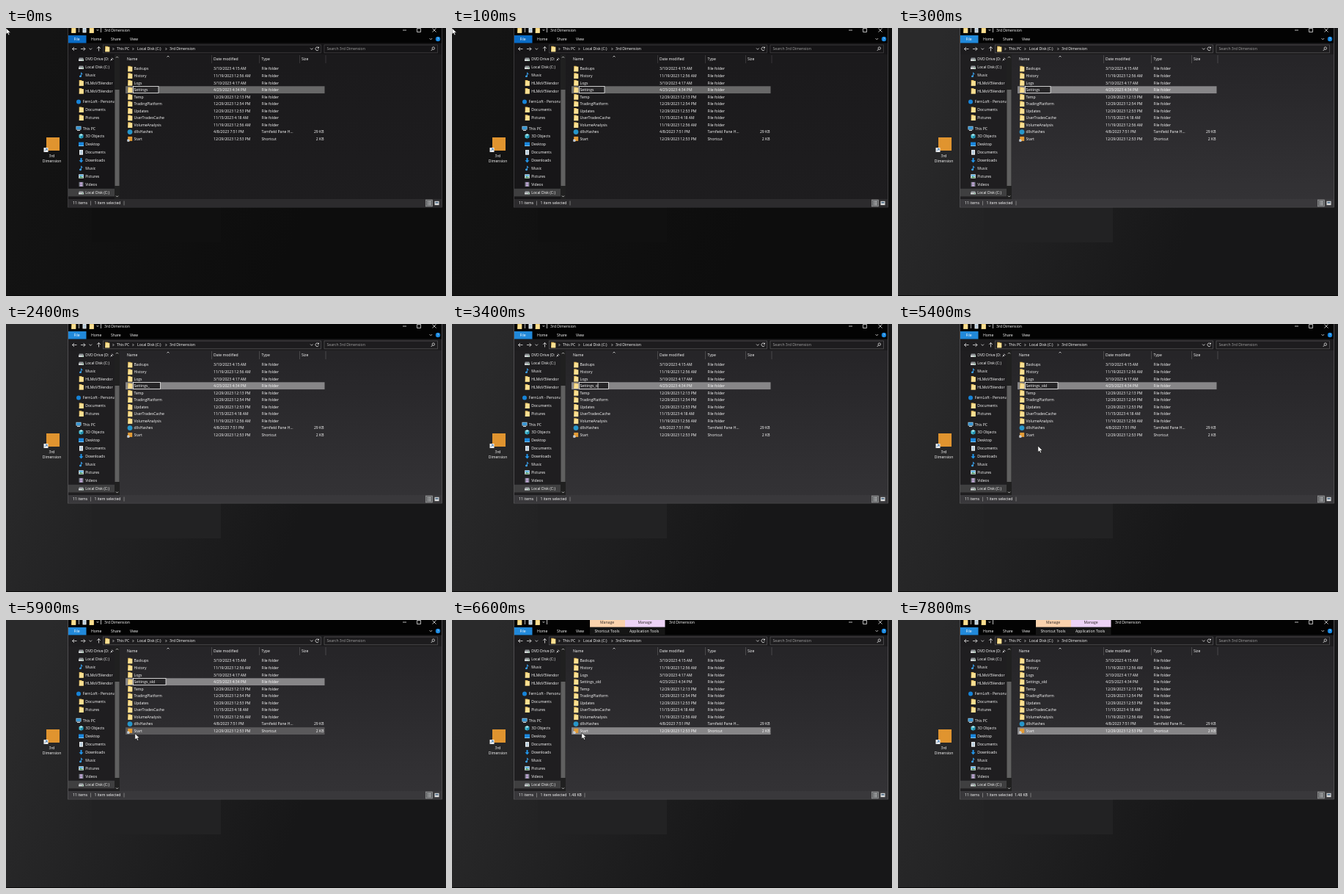
Recreate the animation shown at these times as an HTML page. Size 600 by 365 pixels, loop 8000 ms.

```html
<!DOCTYPE html>
<html lang="en">
<head>
<meta charset="utf-8">
<title>Renaming a folder</title>
<style>
  html, body { margin: 0; width: 100%; height: 100%; overflow: hidden; background: #111; }
  svg {
    display: block; width: 100vw; height: 100vh;
    --desk-left: #2a2a2b; --desk-right: #171718; --panes: #222223;
    --list-top: #262528; --list-end: #343336; --nav: #1f1e20; --bar: #1d1c1e;
    --status: #39383b; --row: #878688; --line: #59585a; --accent: #2189da;
    font: 500 5.1px "Open Sans", "Noto Sans", sans-serif;
  }
  svg.dim {
    --desk-left: #141414; --desk-right: #0d0d0d; --panes: #101010;
    --list-top: #1b1a1c; --list-end: #1e1d1f; --nav: #171618; --bar: #161517;
    --status: #2c2b2d; --row: #686868; --line: #454446; --accent: #0a6cc6;
  }
  text { fill: #fff; white-space: pre; }
  .muted { fill: #a3a3a3; }
  .dark { fill: #2b2422; }
  .stroke { fill: none; stroke: #e4e4e4; stroke-width: .8; }
  .field { fill: none; stroke: var(--line); stroke-width: .7; }
</style>
</head>
<body>
<svg id="stage" viewBox="0 0 600 365" preserveAspectRatio="none">
  <defs>
    <linearGradient id="desk" x2="1" y2=".25">
      <stop offset=".1" style="stop-color:var(--desk-left)"/>
      <stop offset=".8" style="stop-color:var(--desk-right)"/>
    </linearGradient>
    <linearGradient id="sheet" x2="0" y2="1">
      <stop offset=".2" style="stop-color:var(--list-top)"/>
      <stop offset="1" style="stop-color:var(--list-end)"/>
    </linearGradient>
    <clipPath id="navClip"><rect x="85" y="36" width="62.5" height="197"/></clipPath>
    <g id="folder">
      <path d="M-2.8-3.8h3.4l.6.9h2v6.600h-6z" fill="#e3bd5e"/>
      <path d="M-1.800-2.600h5v6.400h-6z" fill="#fbe093"/>
    </g>
    <g id="disk">
      <path d="M-2.6-1.6h5.2l.9 2h-7z" fill="#8f9498"/>
      <path d="M-3.5.4h7v2.4h-7z" fill="#d4d7d9"/>
      <path d="M1.2 1.2h1.4v.8H1.2z" fill="#37a853"/>
    </g>
    <path id="note" d="M-.4-3.4h.9c.3 1.5 2 1.5 1.7 3.4-.5-1-1-1.2-1.7-1.4v3.2a1.5 1.3 0 1 1-.9-1.2z" fill="#3aa0ee"/>
    <g id="cloud"><circle r="3" fill="#1683d8"/></g>
    <g id="pc">
      <path d="M-3.5-2.8h7v4.6h-7z" fill="#b6dcf2"/><path d="M-2.9-2.2h5.8v3.4h-5.8z" fill="#2c8fd0"/>
      <path d="M-2 2.5h4v.8h-4z" fill="#cfd6da"/>
    </g>
    <g id="cube">
      <path d="M0-3.5 3-1.9 0-.3-3-1.9z" fill="#a4edf7"/>
      <path d="M-3-1.9 0-.3v3.6l-3-1.6z" fill="#45c5dc"/><path d="M3-1.9 0-.3v3.6l3-1.6z" fill="#2499bb"/>
    </g>
    <g id="screen"><path d="M-3.5-2.8h7v5.2h-7z" fill="#1a86dc"/><path d="M-3.5 1.5h7v1h-7z" fill="#7cc6f7"/></g>
    <g id="page">
      <path d="M-2.5-3.4h5v6.8h-5z" fill="#eceff1"/>
      <path d="M-1.5-1.6h3M-1.5 0h3M-1.5 1.6h3" stroke="#5d8fb5" stroke-width=".6"/>
    </g>
    <path id="down" d="M-1-3.3h2V0h2L0 3.2-3 0h2z" fill="#2196ec"/>
    <g id="photo">
      <path d="M-3.3-2.8h6.6v5.6h-6.6z" fill="#e7eef2"/><path d="M-2.7-2.2h5.4v2.2h-5.4z" fill="#69b9ea"/>
      <path d="m-2.7 2.2 2-2.6 1.4 1.4.9-.7 1.1 1.9z" fill="#4a9a62"/>
    </g>
    <g id="film">
      <path d="M-3-3.2h6v6.4h-6z" fill="#717680"/><path d="M-1.7-2.6h3.4v2.3h-3.4zM-1.7.3h3.4v2.3h-3.4z" fill="#c4a6d9"/>
    </g>
    <g id="web"><circle r="3.4" fill="#2796ca"/></g>
    <g id="app">
      <path d="M-2.8-3.2h6v6h-6z" fill="#e19a35"/>
      <path d="M-3.7.6h3v3h-3z" fill="#f1f1f1"/><path d="m-3 2.9 1.5-1.5" stroke="#2468a8" stroke-width=".7"/>
    </g>
  </defs>

  <rect width="600" height="365" fill="url(#desk)"/>
  <rect x="117" y="116" width="176" height="176" style="fill:var(--panes)"/>
  <path d="M0 364.5h600" stroke="#090909"/>

  <rect x="55" y="149" width="18" height="18" fill="#e0942f"/>
  <path d="M51.5 163h6v6h-6z" fill="#f0f0f0"/>
  <path d="M53 167.5l3-3m-2.2 0h2.2v2.2" fill="none" stroke="#2468a8" stroke-width=".8"/>
  <g text-anchor="middle"><text x="62.5" y="176.2">3rd</text><text x="62.5" y="183.2">Dimension</text></g>

  <g id="window">
    <rect x="84.5" y="-5" width="510" height="249" fill="url(#sheet)" style="stroke:var(--line)" stroke-width=".8"/>
    <rect x="85" width="509" height="21" fill="#030303"/>
    <rect x="85" y="20.5" width="509" height="15.5" style="fill:var(--bar)"/>
    <rect x="85" y="36" width="63" height="197" style="fill:var(--nav)"/>
    <rect x="85" y="233" width="509" height="10.6" style="fill:var(--status)"/>
    <rect x="85" y="10" width="24.5" height="10.5" style="fill:var(--accent)"/>
    <use href="#folder" x="92" y="3"/><use href="#page" x="107" y="3"/><use href="#folder" x="116.5" y="3"/>
    <path class="stroke" d="M99.5 0v6M129.5 0v6M123.6 2l1.3 1.6L126.2 2"/>
    <path class="stroke" d="M541 3h5M560.5.5h5v5h-5zM581.5.5l5 5m0-5-5 5"/>
    <path class="stroke" d="m577.5 14 1.8 1.8 1.8-1.8"/>
    <circle cx="589" cy="15" r="3.2" fill="#1383dc"/><text x="587.9" y="16.8">?</text>

    <path class="stroke" d="M96.5 28.500h-6l2.500-2.500m-2.500 2.500 2.500 2.500M126.500 31.500v-6l-2.400 2.400m2.400-2.400 2.400 2.400"/>
    <path class="stroke" d="M102 28.500h6l-2.500-2.500m2.500 2.500-2.500 2.500M113.500 27.600l1.800 1.800 1.800-1.800"/>
    <rect class="field" x="132.5" y="23" width="297" height="10.8"/>
    <rect class="field" x="434" y="23" width="154.5" height="10.8"/>
    <use href="#folder" x="138" y="28.5"/>
    <path class="stroke" d="m145.500 27 1.500 1.500-1.500 1.500M172.500 27l1.500 1.500-1.500 1.500M217.500 27l1.500 1.500-1.500 1.500M415 27.500l1.800 1.800 1.800-1.800"/>
    <path class="stroke" d="M426.200 27a2.300 2.300 0 1 0 .2 2.200M426.500 25.500v1.800h-1.800"/>
    <path class="stroke" d="M584.500 27.600a1.700 1.700 0 1 1-3.400 0 1.700 1.700 0 0 1 3.400 0M581.500 29l-1.800 2"/>

    <path class="field" d="M280.500 37v11M345.500 37v11M400.500 37v11M436 37v11"/>
    <path class="stroke" d="m219.500 39.500 1.500-1.500 1.500 1.500"/>

    <rect x="85" y="218.800" width="63" height="10.600" fill="#3f3f40"/>
    <rect x="148" y="36" width="7" height="197" fill="#202020"/>
    <rect x="148.500" y="84" width="6" height="131" fill="#606060"/>
    <path class="stroke" d="m150 40.500 1.500-1.500 1.500 1.500M150 228.500l1.500 1.500 1.500-1.500"/>
    <g id="nav" clip-path="url(#navClip)">
      <path class="stroke" d="m142.500 44.500 1.500-1.500m-1-1 2 2m-1.200-1.200 1.400-1.400m-.8-.8 2 2"/>
    </g>

    <path d="M115.500 235.500v6" stroke="#aaa" stroke-width=".6"/>
    <path id="statusEnd" d="M0 235.500v6" stroke="#aaa" stroke-width=".6"/>
    <rect x="572.500" y="234" width="9" height="9" fill="#66686a" stroke="#a9a9a9" stroke-width=".6"/>
    <path d="M575 236.300h1.200m1 0h2M575 238.500h1.200m1 0h2M575 240.700h1.200m1 0h2" stroke="#fff" stroke-width=".8"/>
    <path d="M584.500 235.800h6v5.400h-6z" fill="#dedede"/><path d="M585.500 236.800h4v2h-4z" fill="#526f88"/>

    <rect id="selected" x="163" width="271.500" height="9.800" style="fill:var(--row)"/>
    <rect id="hover" x="163" y="146.200" width="271.500" height="9.800" fill="#5a595b"/>
    <g id="list"></g>
    <g id="labels"></g>
    <g id="tools">
      <rect x="188" y="0" width="48" height="9.800" fill="#fbd3ad"/>
      <rect x="236" y="0" width="54.500" height="9.800" fill="#edd3f6"/>
      <rect x="188" y="9.800" width="102.500" height="10.700" fill="#151515"/>
    </g>
    <g id="rename">
      <rect id="box" x="173.500" y="79.500" height="9" fill="#262527" stroke="#eee" stroke-width=".8"/>
      <text id="typed" x="174.500" y="85.900"></text>
      <path id="caret" d="M0 80.500v7" stroke="#fff" stroke-width=".8"/>
    </g>
  </g>

  <path id="cursor" d="M0 0v8.600l2-1.800 1.400 3 1.500-.7-1.300-2.900h2.800z" fill="#fff" stroke="#000" stroke-width=".6"/>
</svg>
<script>
const $ = id => document.getElementById(id);
const NS = "http://www.w3.org/2000/svg";

function add(parent, tag, attrs, content = "") {
  const node = document.createElementNS(NS, tag);
  for (const key in attrs) node.setAttribute(key, attrs[key]);
  node.textContent = content;
  return parent.appendChild(node);
}
const label = (parent, x, y, content, cls = "") =>
  add(parent, "text", { x, y: y + 1.9, class: cls }, content);
const icon = (parent, name, x, y) => add(parent, "use", { href: "#" + name, x, y });
const show = (node, on) => { node.style.display = on ? "" : "none"; };

// Navigation groups: first y, x shift, then icon and label per line
const navGroups = [
  [42.2, 0, "disk", "DVD Drive (D:", "disk", "Local Disk (C:)", "note", "Music",
    "folder", "HLMoV5Vendor", "folder", "HLMoV5Vendor"],
  [100.4, -3.5, "cloud", "FernLoft - Personal"],
  [111.2, 0, "folder", "Documents", "folder", "Pictures"],
  [136.6, -3.5, "pc", "This PC"],
  [147.5, 0, "cube", "3D Objects", "screen", "Desktop", "page", "Documents", "down", "Downloads",
    "note", "Music", "photo", "Pictures", "film", "Videos", "disk", "Local Disk (C:)"]
];
for (const [top, shift, ...items] of navGroups)
  for (let i = 0; i < items.length; i += 2) {
    const y = top + i / 2 * 10.9;
    icon($("nav"), items[i], 102.5 + shift, y);
    label($("nav"), 108.3 + shift, y, items[i + 1]);
  }

const files = [
  ["Backups", "3/10/2023 4:15 AM"],
  ["History", "11/19/2023 12:56 AM"],
  ["Logs", "3/10/2023 4:17 AM"],
  ["Settings_old", "4/25/2023 4:34 PM"],
  ["Temp", "12/29/2023 12:13 PM"],
  ["TradingPlatform", "12/29/2023 12:54 PM"],
  ["Updates", "12/29/2023 12:53 PM"],
  ["UserTradesCache", "11/15/2023 4:18 AM"],
  ["VolumeAnalysis", "11/19/2023 12:56 AM"],
  ["dllsHashes", "4/8/2023 7:51 PM", "web", "Tarnfield Pane H...", "29 KB"],
  ["Start", "12/29/2023 12:53 PM", "app", "Shortcut", "2 KB"]
];
const rowY = i => 55.5 + i * 9.56;
files.forEach(([name, date, image = "folder", type = "File folder", size = ""], i) => {
  const y = rowY(i), list = $("list");
  icon(list, image, 169, y);
  label(list, 174.5, y, name);
  label(list, 283, y, date);
  label(list, 348.5, y, type);
  label(list, 433.5, y, size).setAttribute("text-anchor", "end");
});

const labels = [
  [92.5, 15.3, "File"], [116, 15.3, "Home"], [143, 15.3, "Share"], [169, 15.3, "View"],
  [151, 28.4, "This PC"], [179, 28.4, "Local Disk (C:)"], [223, 28.4, "3rd Dimension"],
  [437.5, 28.4, "Search 3rd Dimension", "muted"],
  [165, 42.5, "Name"], [283, 42.5, "Date modified"], [348.5, 42.5, "Type"], [403, 42.5, "Size"],
  [91, 238.4, "11 items"]
];
for (const item of labels) label($("labels"), ...item);
const title = label($("labels"), 134, 3, "3rd Dimension");
const status = label($("labels"), 120.5, 238.4, "");
label($("tools"), 202, 3.3, "Manage", "dark");
label($("tools"), 253.5, 3.3, "Manage", "dark");
label($("tools"), 194.5, 15.3, "Shortcut Tools");
label($("tools"), 242, 15.3, "Application Tools");

// Start time, typed name, box width
const typing = [
  [0, "Settings", 34.5], [1800, "Settings_", 37], [3400, "Settings_o", 40],
  [3600, "Settings_ol", 42], [4100, "Settings_old", 44.5]
];
const caretToggles = [500, 1200, 1500, 2400, 3000, 5200];
const commit = 6100, toolsAt = 6300;

function cursorAt(t) {
  if (t < 300) return [0, 0];
  if (t < 4800 || t >= 7600) return null;
  if (t >= commit) return [176.8, 153.5];
  const p = Math.min(1, Math.floor((t - 4800) / 100) / 8);
  const left = (1 - p) ** 2;
  return [175.8 + 240 * left, 154.5 + 184 * left];
}

function draw(t) {
  const renaming = t < commit, tools = t >= toolsAt;
  $("stage").classList.toggle("dim", t < 300);

  const [, name, width] = typing.filter(step => step[0] <= t).pop();
  show($("rename"), renaming);
  $("box").setAttribute("width", width);
  if ($("typed").textContent !== name) $("typed").textContent = name;
  const end = 174.8 + $("typed").getComputedTextLength();
  $("caret").setAttribute("transform", `translate(${end})`);
  show($("caret"), caretToggles.filter(at => at <= t).length % 2);

  // The row's own label would show through beside the edit box
  show($("list").querySelectorAll("text")[12], !renaming);
  $("selected").setAttribute("y", rowY(renaming ? 3 : 10) - 4.9);
  show($("hover"), renaming && t >= 5600);
  show($("tools"), tools);
  title.setAttribute("x", tools ? 296 : 134);
  status.textContent = tools ? "1 item selected  1.48 KB" : "1 item selected";
  $("statusEnd").setAttribute("transform", `translate(${tools ? 181 : 161})`);

  const spot = cursorAt(t);
  show($("cursor"), spot);
  if (spot) $("cursor").setAttribute("transform", `translate(${spot})`);
}

const start = performance.now();
(function frame() {
  draw((performance.now() - start) % 8000);
  requestAnimationFrame(frame);
})();
</script>
</body>
</html>
```
